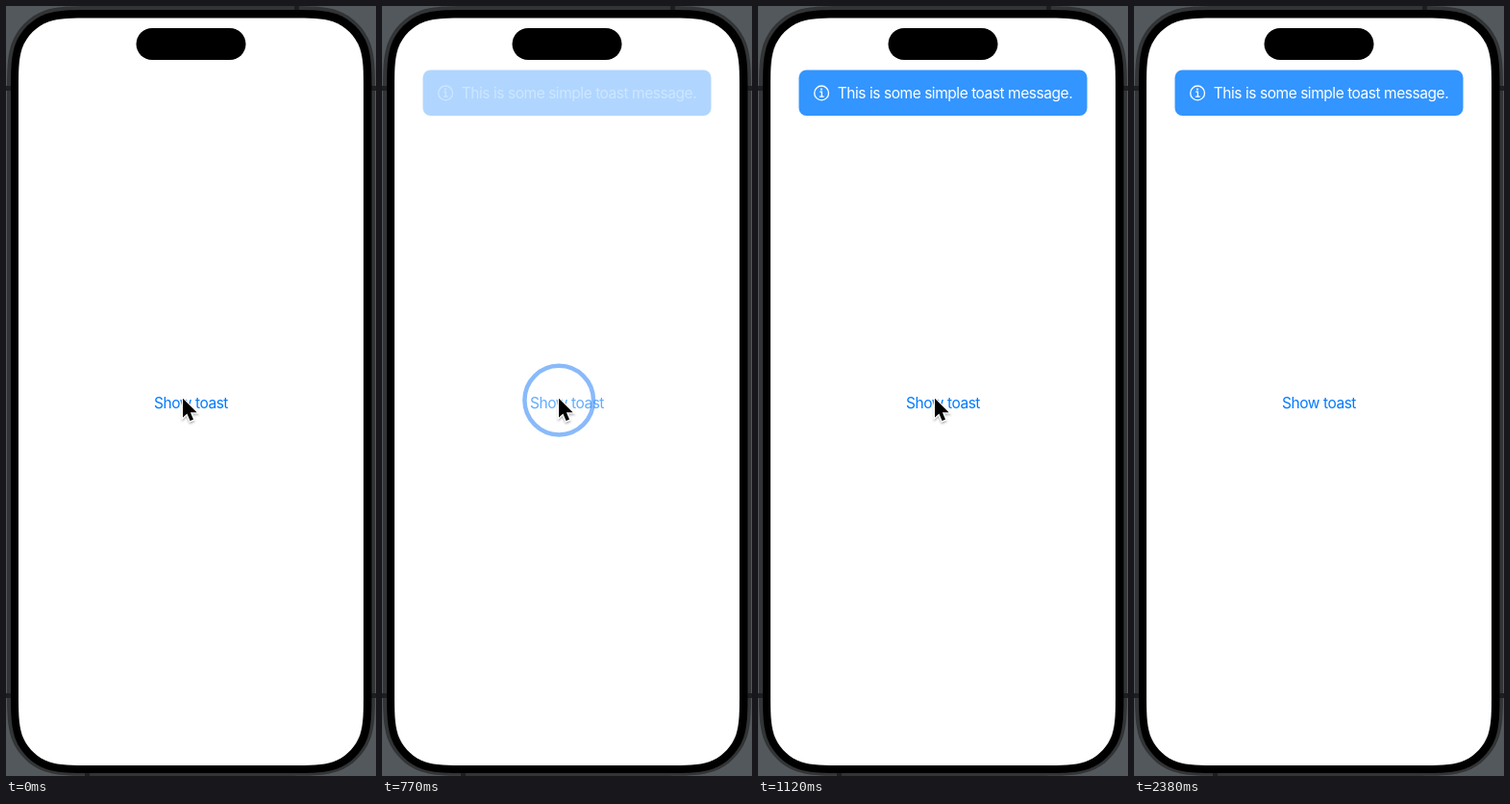
An HTML page for the animation above (2660 ms loop, 385 by 800 pixels).

```html
<!DOCTYPE html>
<html lang="en">
<head>
<meta charset="utf-8">
<title>Toast demo</title>
<style>
  html, body { margin: 0; width: 100%; height: 100%; overflow: hidden; background: #53585d; }
  svg { display: block; width: 385px; height: 800px; }
  text { font: 15.5px Inter, Roboto, sans-serif; letter-spacing: -.45px; text-anchor: middle; }

  .toast, .button, .ring, .cursor { animation: 2660ms infinite; }
  .toast { animation-name: toast; }
  .button { fill: #007aff; animation-name: button; }
  .ring { fill: none; stroke: #4d97f8; animation-name: ring; }
  .cursor { animation-name: cursor; }

  @keyframes toast {
    0% { opacity: 0; animation-timing-function: step-end; }
    23.684% { opacity: .02; animation-timing-function: steps(5); }
    36.842% { opacity: .94; animation-timing-function: step-end; }
    39.473%, 100% { opacity: 1; }
  }
  @keyframes button {
    0% { opacity: 1; animation-timing-function: step-end; }
    23.684% { opacity: .38; animation-timing-function: steps(5); }
    36.842% { opacity: .98; animation-timing-function: step-end; }
    39.473%, 100% { opacity: 1; }
  }
  @keyframes ring {
    0% { opacity: 0; animation-timing-function: step-end; }
    23.684% { opacity: .62; r: 23.5px; stroke-width: 8px; animation-timing-function: steps(4); }
    34.21% { opacity: .7; r: 48.1px; stroke-width: 1px; animation-timing-function: step-end; }
    36.842%, 100% { opacity: 0; r: 48.1px; stroke-width: 1px; }
  }
  @keyframes cursor {
    0% { opacity: 1; animation-timing-function: step-end; }
    42.105% { opacity: 1; animation-timing-function: steps(5); }
    55.263%, 100% { opacity: 0; }
  }
</style>
</head>
<body>
<svg viewBox="0 0 385 800">
  <defs>
    <filter id="soft" x="-50%" y="-50%" width="200%" height="200%">
      <feDropShadow dx="0" dy="1.6" stdDeviation="1.1" flood-opacity=".35"/>
    </filter>
  </defs>

  <path id="rim" fill="#323435"/>
  <g fill="#1d1e1f">
    <rect x="0" y="83" width="6" height="5"/>
    <rect x="379" y="83" width="6" height="5"/>
    <rect x="0" y="714" width="6" height="5"/>
    <rect x="379" y="714" width="6" height="5"/>
    <rect x="300" y="0" width="5" height="4"/>
    <rect x="82" y="796" width="5" height="4"/>
  </g>
  <path id="bezel"/>
  <path id="screen" fill="#fff"/>
  <rect x="135.5" y="23" width="114" height="33" rx="16.5"/>

  <rect class="toast" x="42.5" y="66.5" width="300" height="47.5" rx="8" fill="#3395ff"/>
  <g class="toast" fill="#fff">
    <g fill="none" stroke="#fff" stroke-width="1.3" stroke-linecap="round">
      <circle cx="66.1" cy="90.4" r="7.4"/>
      <path d="M64.7 89.2H66.4V94M64.4 94.1H68.2"/>
    </g>
    <circle cx="66" cy="86.6" r="1.05"/>
    <text x="205" y="96.2">This is some simple toast message.</text>
  </g>

  <text class="button" x="192.5" y="418">Show toast</text>
  <circle class="ring" cx="184.2" cy="409.6" r="23.5"/>
  <path class="cursor" filter="url(#soft)" stroke="#fff" stroke-width="2.2" paint-order="stroke"
    d="M184 407.8V427.4L188.4 423.4L191.6 431L195 429.6L191.9 422.2H198.6Z"/>
</svg>
<script>
  // Rounded rectangle with continuous-curvature corners
  function squircle(x, y, w, h, r) {
    const corner = [[1.5287, 0], [1.0885, 0], [.8684, 0], [.6315, .0749],
      [.3728, .1691], [.1691, .3728], [.0749, .6315],
      [0, .8684], [0, 1.0885], [0, 1.5287]];
    const place = (flipX, flipY, reverse) => {
      const pts = corner.map(([a, b]) => [
        flipX ? x + w - a * r : x + a * r,
        flipY ? y + h - b * r : y + b * r]);
      if (reverse) pts.reverse();
      return pts[0] + "C" + pts.slice(1).join(" ");
    };
    return "M" + [place(0, 0), place(0, 1, true), place(1, 1), place(1, 0, true)].join("L") + "Z";
  }

  const draw = (id, ...box) =>
    document.getElementById(id).setAttribute("d", squircle(...box));

  draw("rim", 1, 0, 383, 800, 62);
  draw("bezel", 5, 4, 375.5, 793, 58);
  draw("screen", 13, 12.5, 359, 776.5, 50);
</script>
</body>
</html>
```
